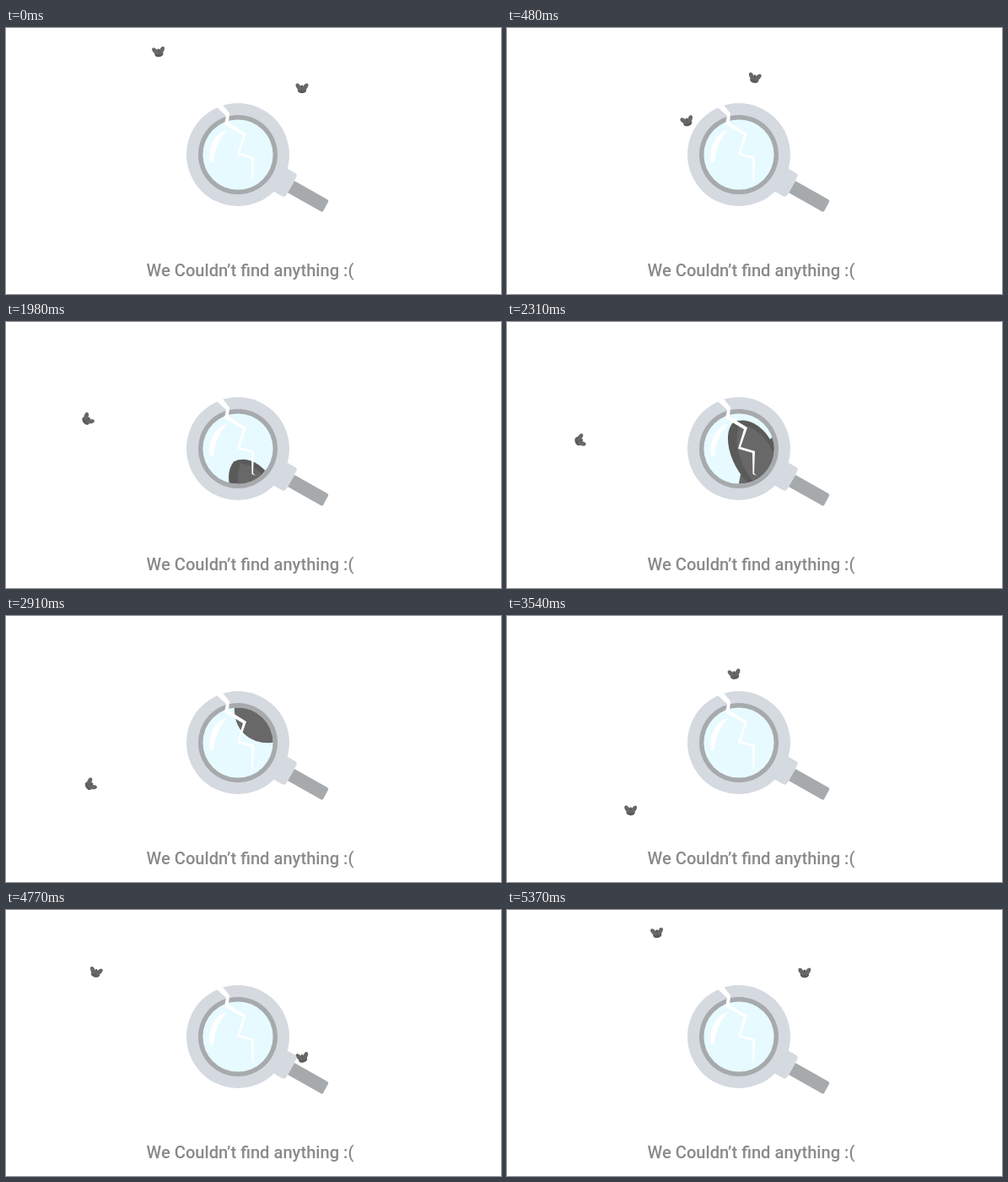
Write an HTML page with a canvas that moves like this. It is 587x315 px and loops after 5.4 s.

```html
<!DOCTYPE html>
<html lang="en">
<head>
<meta charset="utf-8">
<title>Nothing found</title>
<style>
  html, body { margin: 0; width: 587px; height: 315px; overflow: hidden; background: #fff; }
  canvas { display: block; }
  p {
    position: absolute; left: 0; top: 275px; width: 579px; margin: 0;
    text-align: center; white-space: nowrap; color: #8a8a8a;
    font: 500 20.15px/24px Roboto, Lato, sans-serif;
  }
</style>
</head>
<body>
<canvas id="stage" width="587" height="315"></canvas>
<p>We Couldn’t find anything :(</p>
<script>
const ctx = document.getElementById('stage').getContext('2d');
const LOOP = 5400, STEP = 30;
const RIM = '#d5d9e0', STEEL = '#a7aaac', GLASS = '#e7faff', WING = '#686868', BODY = '#5a5a5a';
const LENS = { x: 275, y: 150, r: 41.6 };

// Each route is a closed curve through evenly timed points
const flies = [
  {
    route: [[181, 28], [218, 134], [218, 246], [284, 208], [298, 150], [305, 112], [264, 67], [190, 92], [106, 72]],
    tilt: t => -16 * Math.sin(4 * Math.PI * t / LOOP + 0.5)
  },
  {
    route: [[351, 71], [276, 60], [176, 78], [108, 104], [86, 148], [105, 207], [154, 232], [261, 250], [354, 170]],
    tilt: t => 75 * Math.exp(-(((t - 2600) / 750) ** 2)) - 18 * Math.sin(2 * Math.PI * (t - 2700) / LOOP)
  }
];

// Catmull-Rom interpolation around the loop
function along(route, t) {
  const n = route.length, s = t / LOOP * n, i = Math.floor(s), u = s - i;
  const [a, b, c, d] = [-1, 0, 1, 2].map(k => route[(i + k + n) % n]);
  return [0, 1].map(j => b[j] + u / 2 * (c[j] - a[j] +
    u * (2 * a[j] - 5 * b[j] + 4 * c[j] - d[j] + u * (3 * (b[j] - c[j]) + d[j] - a[j]))));
}

function ellipse(x, y, rx, ry, turn, color) {
  ctx.fillStyle = color;
  ctx.beginPath();
  ctx.ellipse(x, y, rx, ry, turn, 0, Math.PI * 2);
  ctx.fill();
}

const disc = (r, color) => ellipse(LENS.x, LENS.y, r, r, 0, color);

function fill(d, color) {
  ctx.fillStyle = color;
  ctx.fill(new Path2D(d));
}

function drawFly({ route, tilt }, t) {
  ctx.save();
  ctx.translate(...along(route, t));
  ctx.rotate(tilt(t) * Math.PI / 180);
  ellipse(0, 0, 1.7, 3.6, 0, BODY);
  ellipse(0, 2.8, 5.2, 3.4, 0, BODY);
  for (const side of [-1, 1]) ellipse(3.8 * side, -1, 2.6, 5, 0.6 * side, WING);
  ctx.restore();
}

// Enlarged fly drifting upwards behind the glass
function drawMagnified(t) {
  const k = (t - 2310) / 600;
  ctx.save();
  ctx.beginPath();
  ctx.arc(LENS.x, LENS.y, LENS.r, 0, Math.PI * 2);
  ctx.clip();
  ctx.translate(-4 * k, -84 * k);
  ellipse(322, 187, 51, 43, -Math.PI / 4, WING);
  fill('M268 119C284 111 303 123 312 139L320 130V190H285C264 168 255 134 268 119Z', BODY);
  fill('M276 121C294 123 312 140 318 162V190H293C274 168 268 140 276 121Z', WING);
  ctx.restore();
}

function drawGlass(t) {
  fill('M342 181L381 203Q383 204 382 206L376 217Q375 218 373 217L334 195Z', STEEL);
  fill('M331 165L343 172Q346 174 344 177L333 197Q331 201 327 199L315 192Z', RIM);
  disc(61, RIM);
  disc(47, STEEL);
  disc(LENS.r, GLASS);
  drawMagnified(t);
  fill('M262 121C247 124 239 142 242 159L246 159C247 144 253 131 262 121Z', '#fff');
  fill('M250 94L257 91L265 101L264 112L285 125L277 148L294 153L293 179L296 182' +
       'L291.5 180L291 155L274 150L281 127L259 114L261 104Z', '#fff');
}

function draw(now) {
  const t = Math.floor((now % LOOP) / STEP) * STEP;
  ctx.clearRect(0, 0, 587, 315);
  for (const fly of flies) drawFly(fly, t);
  drawGlass(t);
}

let start;
function tick(now) {
  start ??= now;
  draw(now - start);
  requestAnimationFrame(tick);
}
draw(0);
requestAnimationFrame(tick);
</script>
</body>
</html>
```
